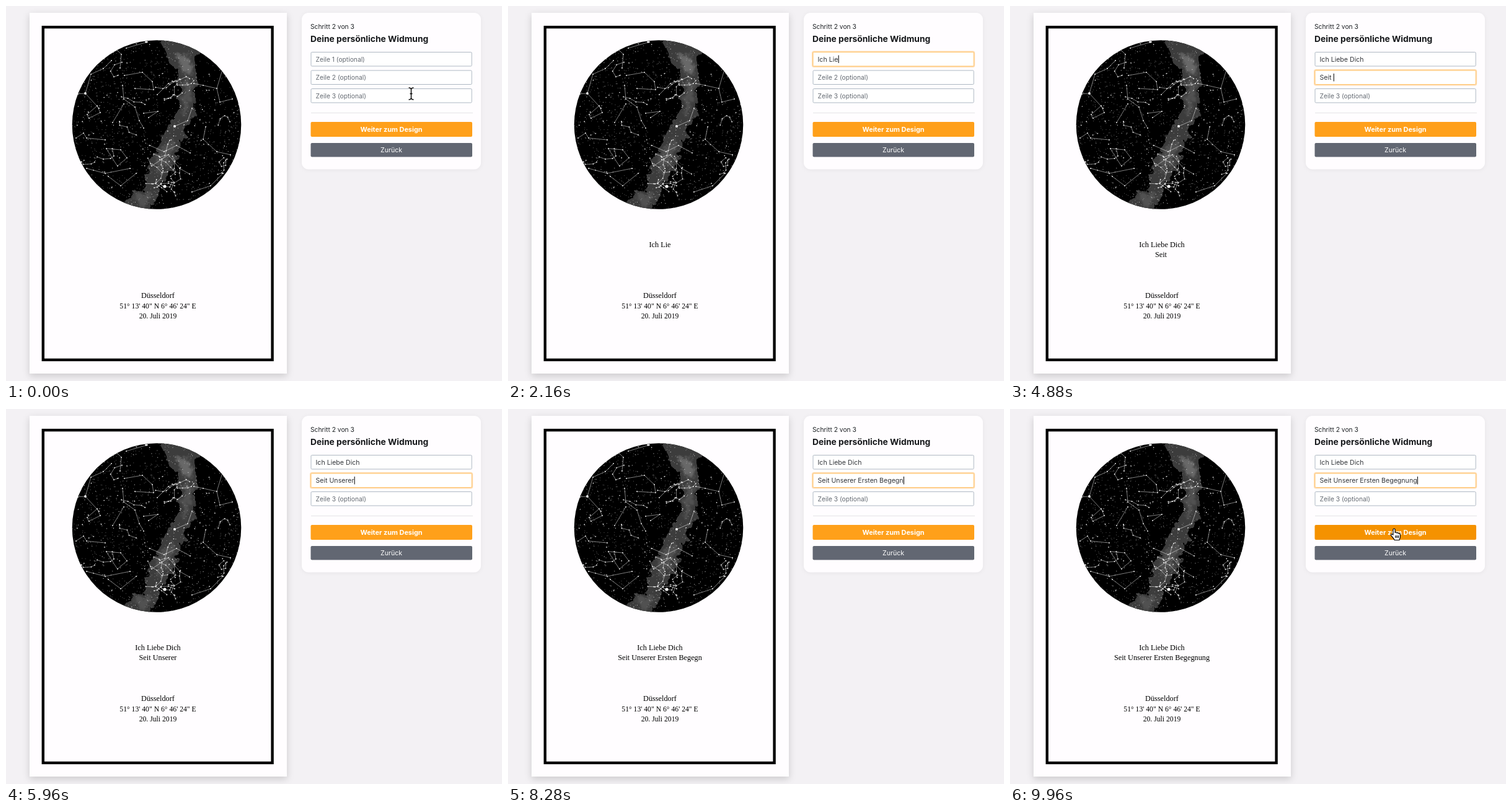
These frames come from a looping animation (800 px wide and 605 px high, 10 s). An HTML page:

```html
<!DOCTYPE html>
<html lang="de">
<head>
<meta charset="utf-8">
<title>Sternenkarte</title>
<style>
  html, body { margin: 0; width: 100%; height: 100%; overflow: hidden; background: #f3f1f4; }
  svg { display: block; }
  text { white-space: pre; }
  .sheet { fill: #fffdff; filter: drop-shadow(0 4px 6px rgba(0, 0, 0, .16)); }
  .card { fill: #fffdff; filter: drop-shadow(0 1px 3px rgba(0, 0, 0, .05)); }
  .serif { font: 12.25px "Liberation Serif", serif; text-anchor: middle; fill: #000; }
  .num { font-size: 11.7px; }
  .ui { font: 10.6px Inter, sans-serif; fill: #33363b; }
  .step { font-size: 10.3px; fill: #1d2024; }
  .hint { font-size: 10.25px; fill: #646a72; }
  .title { font-size: 13.8px; font-weight: 700; fill: #16181b; }
  .btn { text-anchor: middle; fill: #fff; }
  .strong { font-size: 10.9px; font-weight: 700; }
  .box { fill: #fff; stroke-width: 1; }
  .glow { fill: none; stroke: #ff9f1c; stroke-width: 4; }
  .line { fill: none; stroke: #fff; stroke-linecap: round; stroke-linejoin: round; }
</style>
</head>
<body>
<svg id="stage" width="800" height="605" viewBox="0 0 800 605">
  <defs>
    <clipPath id="disc"><circle cx="243" cy="191.5" r="136.3"/></clipPath>
    <filter id="soft" x="-30%" y="-30%" width="160%" height="160%"><feGaussianBlur stdDeviation="2"/></filter>
    <filter id="ragged" x="-20%" y="-10%" width="140%" height="120%" color-interpolation-filters="sRGB">
      <feTurbulence type="fractalNoise" baseFrequency=".07" numOctaves="3" seed="5"/>
      <feDisplacementMap in="SourceGraphic" scale="22" xChannelSelector="R" yChannelSelector="G"/>
    </filter>
    <path id="beamShape" d="M-4-9.5Q0-9.5 0-6.5V6.5Q0 9.5-4 9.5M4-9.5Q0-9.5 0-6.5M0 6.5Q0 9.5 4 9.5M-2 0H2"/>
  </defs>

  <rect class="sheet" x="38" y="11" width="415" height="582"/>
  <rect x="59.8" y="34.1" width="369.8" height="536.8" fill="none" stroke="#000" stroke-width="4.4"/>
  <circle cx="243" cy="191.5" r="136.3"/>
  <g clip-path="url(#disc)">
    <g filter="url(#ragged)">
      <path fill="#3c3c3c" d="M247 50L304 50 308 75 309 105 306 140 302 175 288 200 285 225 272 250 259 280 247 303 230 335 188 335 197 304 221 296 228 275 232 250 246 225 258 202 275 175 280 145 277 110 267 92 258 75Z"/>
      <g filter="url(#soft)">
        <path fill="#777" opacity=".75" d="M276 76L291 80 302 100 296 112 283 104 275 90Z"/>
        <path fill="#666" opacity=".5" d="M288 112L301 125 295 170 284 178 287 145ZM243 238L270 212 272 235 246 275ZM203 309L224 302 238 302 221 325Z"/>
      </g>
    </g>
    <g id="sky"></g>
  </g>
  <g class="serif">
    <text id="print0" x="245" y="388.5"></text>
    <text id="print1" x="245" y="405"></text>
    <text x="245" y="471">Düsseldorf</text>
    <text class="num" x="245" y="487.5">51° 13' 40" N 6° 46' 24" E</text>
    <text class="num" x="245" y="504">20. Juli 2019</text>
  </g>

  <rect class="card" x="477" y="11" width="289" height="252.5" rx="11"/>
  <text class="ui step" x="491" y="36.8">Schritt 2 von 3</text>
  <text class="ui title" x="491" y="57.5">Deine persönliche Widmung</text>
  <g id="fields"></g>
  <path d="M492 172.5H753" stroke="#e4e4e6"/>
  <rect id="next" x="491.5" y="187" width="260.5" height="24" rx="2"/>
  <text class="ui btn strong" x="621.5" y="202.7">Weiter zum Design</text>
  <rect x="491.5" y="221" width="260.5" height="22.5" rx="2" fill="#626772"/>
  <text class="ui btn" x="621.5" y="235.5">Zurück</text>

  <path id="caret" stroke="#111" stroke-width="1.1"/>
  <g id="pointer">
    <g id="beam" fill="none">
      <use href="#beamShape" stroke="#fff" stroke-width="3.4"/>
      <use href="#beamShape" stroke="#000" stroke-width="1.4"/>
    </g>
    <path id="arrow" fill="#000" stroke="#fff" d="M0 0V14.5L3.4 11.4 5.7 16.6 8.2 15.5 6 10.4H10.5Z"/>
    <path id="hand" fill="#fff" stroke="#000" stroke-width="1.2" stroke-linejoin="round" transform="translate(-5.6)" d="M4 10V1.6a1.6 1.6 0 0 1 3.2 0V6.5C7.8 5.3 10.2 5.6 10.2 7.2 10.9 6.2 13 6.5 13 8.2 13.8 7.4 15.5 7.9 15.5 9.3V13C15.5 16 14.3 16.4 14.2 18.5H6.2C5.2 15.4 1.6 12.6.5 10.6 0 8.8 2.3 8.2 4 10ZM8 11V15M10.3 11V15M12.6 11V15"/>
  </g>
</svg>
<script>
const LOOP = 10000;
const $ = id => document.getElementById(id);

function add(parent, tag, attrs) {
  const el = document.createElementNS('http://www.w3.org/2000/svg', tag);
  for (const key in attrs) el.setAttribute(key, attrs[key]);
  return parent.appendChild(el);
}

// Sky: scattered stars, the main figures and some small seeded chains
let seed = 41;
const rand = () => (seed = seed * 16807 % 2147483647) / 2147483647;
const dot = (x, y) => `M${(+x).toFixed(1)} ${(+y).toFixed(1)}h.01`;
const polar = r => {
  const a = rand() * Math.PI * 2;
  return [243 + r * Math.cos(a), 191.5 + r * Math.sin(a)];
};

function scatter(count, width, opacity) {
  let d = '';
  for (let i = 0; i < count; i++) d += dot(...polar(136 * Math.sqrt(rand())));
  add($('sky'), 'path', { class: 'line', d, 'stroke-width': width, opacity });
}

function chain(x, y) {
  let d = `M${x.toFixed(1)} ${y.toFixed(1)}`, turn = rand() * 6.3;
  for (let i = 0; i < 4; i++) {
    turn += (rand() - .5) * 2.8;
    const step = 5 + rand() * 8;
    x += Math.cos(turn) * step;
    y += Math.sin(turn) * step;
    d += `L${x.toFixed(1)} ${y.toFixed(1)}`;
  }
  return d;
}

function drawSky() {
  scatter(1000, .9, .5);
  scatter(300, 1.2, .75);
  scatter(60, 1.7, .9);
  let figures = 'M111 142L128 141 150 165M128 141L137 110 157 101 170 88' +
    'M176 68L186 78 184 100M194 68L228 58M191 112L220 107 236 122 238 135 208 133' +
    'M188 128L190 150 208 163 215 185 222 197M172 188L190 158M131 175L147 161 152 172 134 181Z' +
    'M222 173L245 170 230 180M244 143L262 125 280 118' +
    'M322 72L338 85 349 103 340 133 318 128 303 125M340 133L345 155 365 150' +
    'M272 194L293 185 300 165M113 213L125 205 130 213 160 216' +
    'M162 230L185 232 195 245 180 258ZM130 262L160 270 200 262M165 275L185 290 210 270' +
    'M232 225L255 235 275 225 297 237M235 258L262 240 280 262 296 271' +
    'M322 195L318 215 340 235 362 240M300 300L330 290 350 270';
  for (let i = 0; i < 10; i++) figures += chain(238 + rand() * 58, 225 + rand() * 75);
  for (let i = 0; i < 14; i++) figures += chain(...polar(60 + rand() * 68));
  add($('sky'), 'path', { class: 'line', d: figures, 'stroke-width': .75, opacity: .65 });
  const nodes = [...figures.matchAll(/([\d.]+) ([\d.]+)/g)].map(m => dot(m[1], m[2])).join('');
  add($('sky'), 'path', { class: 'line', d: nodes, 'stroke-width': 2, opacity: .85 });
  for (const [x, y, r] of [[256, 291, 2.6], [272, 194, 2], [128, 141, 1.9], [226, 58, 1.7]])
    add($('sky'), 'circle', { cx: x, cy: y, r, fill: '#fff' });
}

// Form: keys holds [time, letters typed so far]
const fields = [
  { text: 'Ich Liebe Dich', from: 600, to: 3470, keys: [[1240, 1], [2140, 7], [3190, 14]] },
  { text: 'Seit Unserer Ersten Begegnung', from: 3470, to: Infinity,
    keys: [[4180, 1], [4800, 5], [6960, 19], [8200, 26], [8700, 29]] },
  { text: '', from: Infinity, to: Infinity, keys: [[Infinity, 0]] }
];

fields.forEach((f, i) => {
  f.y = 74.5 + i * 29.5;
  const frame = { x: 492, y: f.y, width: 259.2, height: 22.5, rx: 1.5 };
  f.glow = add($('fields'), 'rect', { ...frame, class: 'glow' });
  f.box = add($('fields'), 'rect', { ...frame, class: 'box' });
  f.label = add($('fields'), 'text', { x: 499.5, y: f.y + 15.1 });
  f.print = $('print' + i);
});

const clamp = v => Math.max(0, Math.min(1, v));
const fade = (t, start) => {
  const u = clamp((t - start) / 150);
  return u * u * (3 - 2 * u);
};
const mix = (a, b, u) => `rgb(${a.map((v, i) => Math.round(v + (b[i] - v) * u))})`;

function typed(keys, t) {
  if (t < keys[0][0]) return 0;
  for (let i = 1; i < keys.length; i++) {
    const [t0, n0] = keys[i - 1], [t1, n1] = keys[i];
    if (t < t1) return Math.floor(n0 + (n1 - n0) * (t - t0) / (t1 - t0));
  }
  return keys[keys.length - 1][1];
}

function drawField(f, i, t) {
  const value = f.text.slice(0, typed(f.keys, t));
  const lit = fade(t, f.from) - fade(t, f.to);
  f.label.textContent = value || `Zeile ${i + 1} (optional)`;
  f.label.setAttribute('class', value ? 'ui' : 'ui hint');
  f.glow.style.opacity = lit * .36;
  f.box.style.stroke = mix([174, 184, 195], [255, 197, 112], lit);
  if (f.print) f.print.textContent = value;
  if (t < f.from || t >= f.to) return;

  const first = f.keys[0][0], last = f.keys[f.keys.length - 1][0];
  const still = t < first ? t - f.from : Math.max(0, t - last);
  const x = 500.3 + (value ? f.label.getComputedTextLength() : 0);
  $('caret').setAttribute('d', `M${x} ${f.y + 5}v12.5`);
  show('caret', still % 1000 < 500);
}

const show = (id, on) => { $(id).style.display = on ? '' : 'none'; };
const glide = (a, b, u) => a + (b - a) * (1 - Math.cos(Math.PI * clamp(u))) / 2;

function drawPointer(t) {
  const back = t >= 9000;
  const u = back ? (t - 9000) / 720 : (t - 80) / 460;
  const x = back ? glide(640, 619.5, u) : glide(653.5, 640, u);
  const y = back ? glide(88, 193, u) : glide(141.5, 88, u);
  const overField = fields.some(f => y >= f.y && y <= f.y + 22.5);
  const overNext = y >= 187;
  show('pointer', back || t < 1240);
  show('beam', overField);
  show('hand', overNext);
  show('arrow', !overField && !overNext);
  $('pointer').setAttribute('transform', `translate(${x} ${y})`);
  $('next').style.fill = mix([255, 160, 26], [245, 146, 0], fade(t, 9600));
}

function render(t) {
  show('caret', false);
  fields.forEach((f, i) => drawField(f, i, t));
  drawPointer(t);
}

drawSky();
const begin = performance.now();
function tick() {
  render((performance.now() - begin) % LOOP);
  requestAnimationFrame(tick);
}
tick();
</script>
</body>
</html>
```
